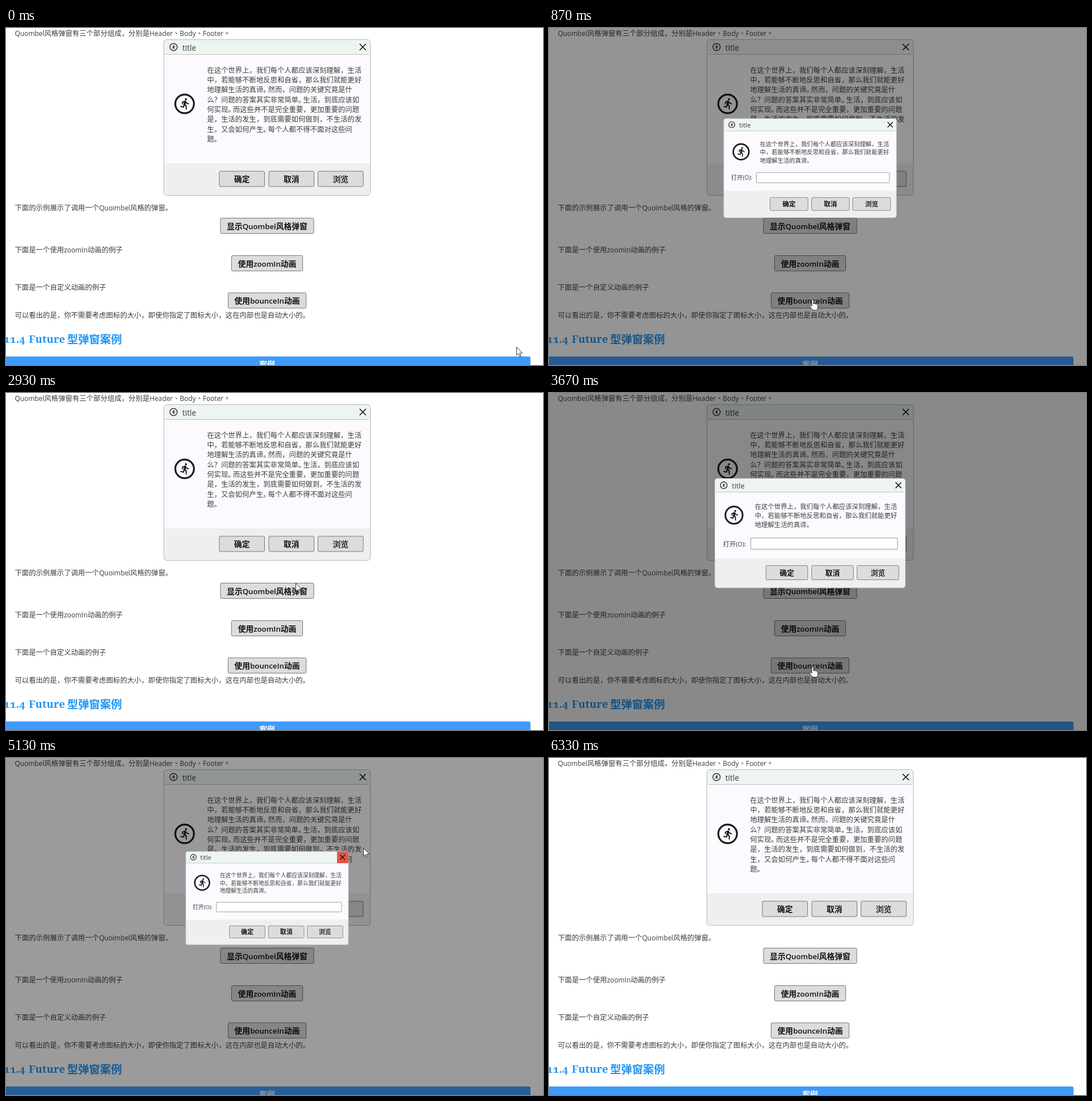
These frames come from a looping animation (944x593 px, 6.6 s). An HTML page:

```html
<!DOCTYPE html>
<html lang="zh-CN">
<head>
<meta charset="utf-8">
<style>
  html, body { margin: 0; width: 100%; height: 100%; overflow: hidden; background: #fff; }
  svg { display: block; width: 944px; height: 593px; }
  text { font-family: "Open Sans", "Noto Sans CJK SC", sans-serif; fill: #3c3c3c; white-space: pre; }
  .tc { font-family: "Open Sans", "Noto Sans CJK TC", sans-serif; }
  .label { font-weight: 600; text-anchor: middle; fill: #111; }
  .light { font-weight: 400; stroke: #111; stroke-width: .3px; }
  .button { fill: #dddbde; stroke: #777; }
  .heading { font-weight: 700; fill: #2196f3; }
  .serif { font-family: "Noto Serif", serif; font-variant-numeric: oldstyle-nums; }
</style>
</head>
<body>
<svg id="stage" viewBox="0 0 944 593" xmlns="http://www.w3.org/2000/svg"></svg>
<script>
const LOOP = 6600, STEP = 1000 / 15;
const BODY = [
  '在这个世界上，我们每个人都应该深刻理解，生活',
  '中，若能够不断地反思和自省，那么我们就能更好',
  '地理解生活的真谛。然而，问题的关键究竟是什',
  '么？问题的答案其实非常简单。生活，到底应该如',
  '何实现。而这些并不是完全重要，更加重要的问题',
  '是，生活的发生，到底需要如何做到，不生活的发',
  '生，又会如何产生。每个人都不得不面对这些问',
  '题。'
];

// Latin runs are set slightly smaller; a full stop is followed by a tighter gap.
const text = (x, y, string, size = 12.35, cls = '') => {
  const runs = string
    .replace(/[A-Za-z():]+/g, run => `<tspan font-size="${size * .963}">${run}</tspan>`)
    .replace(/。([^<])/g, '。<tspan dx="-4">$1</tspan>');
  return `<text x="${x}" y="${y}" font-size="${size}" class="${cls}">${runs}</text>`;
};

const button = (x, y, w, label, cls = '', id = '') =>
  `<rect ${id && `id="${id}"`} class="button" x="${x}" y="${y}" width="${w}" height="27" rx="2"/>` +
  text(x + w / 2, y + 19, label, 13.75, 'label ' + cls);

const runner = (x, y, r, line) => `
  <g transform="translate(${x} ${y})">
    <circle r="${r}" fill="none" stroke="#1c1a1d" stroke-width="${line}"/>
    <path transform="scale(${r * .057}) translate(-11 -12.2)" fill="#1c1a1d"
      d="M13.5 5.5a2 2 0 1 0 0-4 2 2 0 0 0 0 4zM9.9 19.4l1-4.4 2.1 2v6h2v-7.5l-2.1-2 .6-3c1.3 1.5 3.3 2.5 5.5 2.5v-2c-1.9 0-3.5-1-4.3-2.4l-1-1.6c-.4-.6-1-1-1.7-1-.3 0-.5.1-.8.1L6 8.300v4.700h2V9.600l1.800-.7L8.200 17l-4.900-1-.4 2z"/>
  </g>`;

const dialog = (top, height, iconY, textY, lines, extra = '') => `
  <g transform="translate(277.5 ${top})">
    <rect width="363" height="${height}" rx="5" fill="#efefef"/>
    <path d="M0 26V5q0-5 5-5h353q5 0 5 5v21z" fill="#eef5f1"/>
    <rect y="26" width="363" height="${height - 82.5}" fill="#fdfaff"/>
    <path d="M2.500 26h358" stroke="#b4c2bb"/>
    ${extra}
    <rect width="363" height="${height}" rx="5" fill="none" stroke="#b8b8b8"/>
    ${runner(17, 13, 6.4, 1.3)}
    ${text(32.5, 19, 'title', 14.2)}
    <path d="M344.200 7.500l11 11m0-11l-11 11" stroke="#111" stroke-width="1.700"/>
    ${runner(36.5, iconY, 16.4, 3.2)}
    ${lines.map((line, i) => text(76, textY + i * 17.35, line)).join('')}
    ${button(97.5, height - 42.5, 79.5, '确定')}
    ${button(184.5, height - 42.5, 79.5, '取消')}
    ${button(271, height - 42.5, 79.5, '浏览', 'light')}
  </g>`;

const popupExtra = `
  <path id="closeHot" d="M337.500 26V0H358q5 0 5 5v21z" fill="#df5548"/>
  <rect x="68.500" y="113.500" width="279.500" height="21.500" rx="1" fill="#fff" stroke="#8c8c8c"/>
  ${text(15.5, 129.2, '打开(O):')}`;

const stage = document.getElementById('stage');
stage.innerHTML = `
  <rect width="944" height="593" fill="#fff"/>
  ${text(15.5, 14, 'Quombel风格弹窗有三个部分组成，分别是Header、Body、Footer。', 12.35, 'tc')}
  ${dialog(20.5, 274, 113, 58, BODY)}
  ${text(15.5, 320.5, '下面的示例展示了调用一个Quoimbel风格的弹窗。')}
  ${button(377, 334.5, 164, '显示Quombel风格弹窗')}
  ${text(15.5, 395, '下面是一个使用zoomIn动画的例子')}
  ${button(396.5, 400.5, 125, '使用zoomIn动画')}
  ${text(15.5, 461, '下面是一个自定义动画的例子')}
  ${button(390.5, 466, 137, '使用bounceIn动画', '', 'trigger')}
  ${text(15.5, 509.5, '可以看出的是，你不需要考虑图标的大小，即使你指定了图标大小，这在内部也是自动大小的。')}
  <text class="heading serif" x="-4" y="554" font-size="18.5">11.4</text>
  <text class="heading serif" x="40" y="554" font-size="18.5">Future</text>
  <text class="heading" x="107.500" y="554.500" font-size="19.300">型弹窗案例</text>
  <rect x="-10" y="578" width="932" height="30" rx="3" fill="#409afa"/>
  <text class="label" x="459" y="596.500" font-size="13.800" style="fill:#fff">案例</text>
  <rect id="shade" width="944" height="593"/>
  <g id="popup">${dialog(142.3, 208.7, 70, 57.8, BODY.slice(0, 2).concat('地理解生活的真谛。'), popupExtra)}</g>
  <g id="cursor" fill="#fff" stroke="#222" stroke-width=".9" stroke-linejoin="round">
    <path id="arrow" d="M.5 .5v14.500l3.400-3.200 2.300 5.200 2.100-.9-2.300-5.100h4.700z"/>
    <path id="hand" transform="translate(-5 0)" d="M4 1.500c0-2 3-2 3 0v6c.6-1.200 2.600-1 2.800.3.7-.9 2.500-.6 2.600.6.8-.7 2.200-.3 2.200 1v3.600c0 2.400-1 4-2 5.500H5.600C4.500 16.500 2 14.500.4 11.600c-.8-1.600 1.200-2.400 2.300-1.200L4 11.800z"/>
  </g>`;

const $ = id => document.getElementById(id);
const [shade, popup, closeHot, trigger, cursor, arrow, hand] =
  ['shade', 'popup', 'closeHot', 'trigger', 'cursor', 'arrow', 'hand'].map($);

// Pointer path: time, x, y
const PATH = [
  [0, 897, 561], [40, 897, 561], [130, 840, 552], [400, 500, 485], [530, 463, 478],
  [1270, 463, 478], [1400, 500, 420], [1800, 615, 170], [1930, 619, 157], [2130, 616, 157],
  [2610, 616, 157], [2933, 509, 334], [3200, 465, 470], [3330, 463, 481],
  [4000, 463, 482], [4333, 593, 217], [4600, 624, 176], [4730, 627, 168], [4800, 628, 163],
  [4930, 628, 158], [5540, 628, 158], [6200, 92, 578], [6270, 72, 584], [6330, 60, 600], [LOOP, 60, 600]
];

const ramp = (t, start, duration) => Math.min(1, Math.max(0, (t - start) / duration));

function pointer(t) {
  const i = PATH.findIndex(key => key[0] > t);
  const [a, b] = [PATH[i - 1], PATH[i]];
  const k = ramp(t, a[0], b[0] - a[0]);
  return [a[1] + (b[1] - a[1]) * k, a[2] + (b[2] - a[2]) * k];
}

const opening = (t, start, duration) => 1 - (1 - ramp(t, start, duration)) ** 2;
const closing = (t, start) => 1 - ramp(t, start, 220) ** 2;

function draw(now) {
  const t = Math.floor((now % LOOP + 4) / STEP) * STEP % LOOP;
  const second = t > 3000;
  const shown = second
    ? opening(t, 3385, 390) * closing(t, 5032)
    : opening(t, 652, 360) * closing(t, 2296);
  shade.setAttribute('opacity', shown / 2);
  popup.style.display = shown ? '' : 'none';
  popup.setAttribute('transform', `translate(459 246.6) scale(${shown}) translate(-459 -246.6)`);
  closeHot.setAttribute('opacity', ramp(t, second ? 4760 : 1900, 200));

  const [x, y] = pointer(t);
  const over = x > 390 && x < 528 && y > 466 && y < 494;
  cursor.setAttribute('transform', `translate(${x} ${y})`);
  arrow.style.display = over ? 'none' : '';
  hand.style.display = over ? '' : 'none';
  trigger.style.fill = over && !shown ? '#cfcdd0' : '';
}

const begin = performance.now();
function tick() {
  draw(performance.now() - begin);
  requestAnimationFrame(tick);
}
tick();
</script>
</body>
</html>
```
